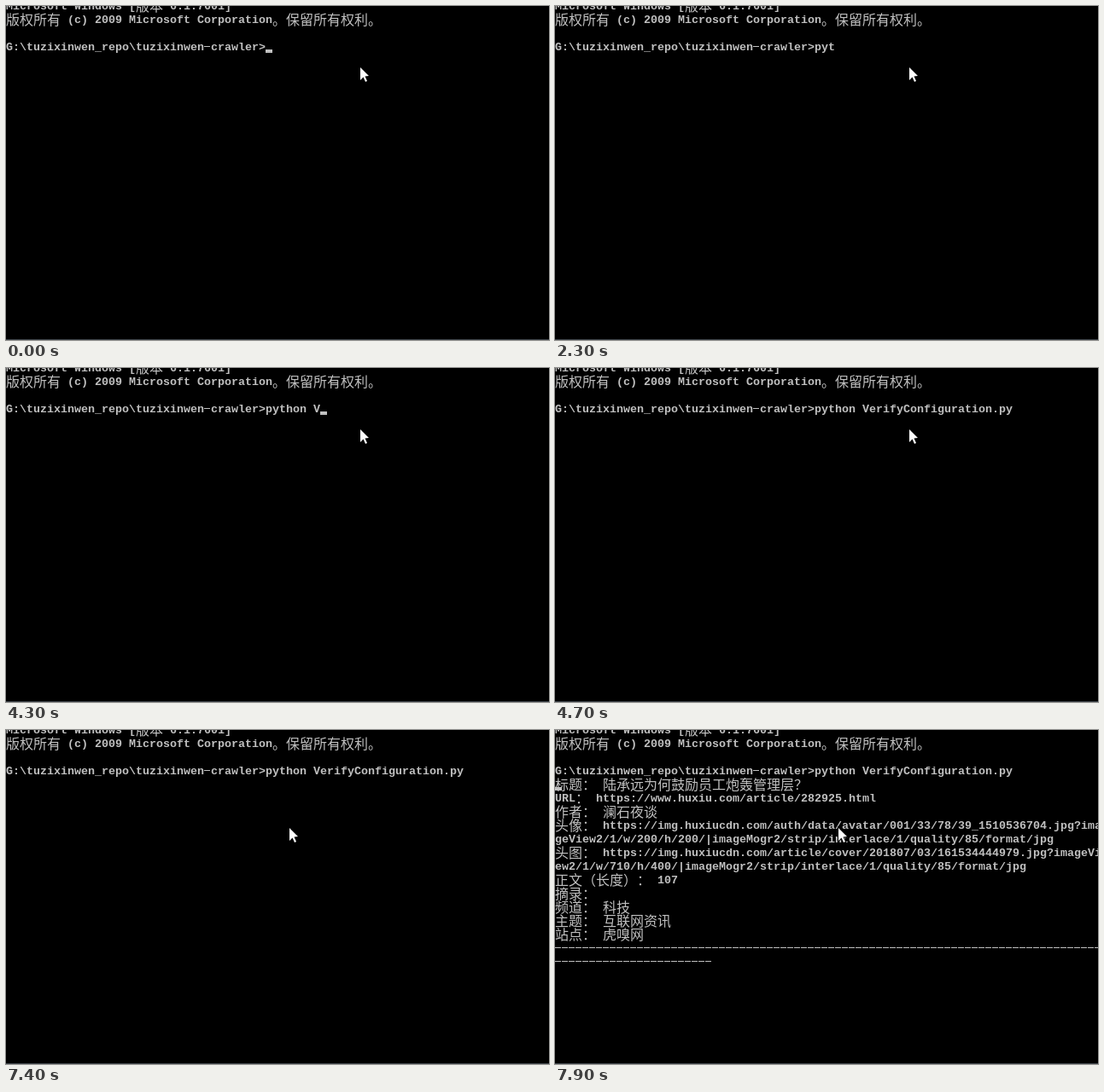
Recreate the animation shown at these times as an HTML page with a canvas. Size 636 px wide and 392 px high, loop 8 s.

```html
<!DOCTYPE html>
<html lang="zh-CN">
<head>
<meta charset="utf-8">
<title>Console</title>
<style>
html, body { margin: 0; width: 100%; height: 100%; overflow: hidden; background: #000; }
canvas { display: block; }
</style>
</head>
<body>
<canvas id="stage" width="636" height="392"></canvas>
<script>
const ctx = document.getElementById('stage').getContext('2d');
const LOOP = 8000, STEP = 100, CELL = 8, ROW = 16;
const LATIN = 'bold 13.333px "Liberation Mono", monospace';
const CJK = '300 16px "Noto Sans CJK SC", "Noto Sans CJK", sans-serif';

const header = [
  'Microsoft Windows [版本 6.1.7601]',
  '版权所有 (c) 2009 Microsoft Corporation。保留所有权利。',
  ''
];
const prompt = 'G:\\tuzixinwen_repo\\tuzixinwen-crawler>';
const command = 'python VerifyConfiguration.py';
const tail = 'strip/interlace/1/quality/85/format/jpg';
const output = [
  '标题： 陆承远为何鼓励员工炮轰管理层？',
  'URL： https://www.huxiu.com/article/282925.html',
  '作者： 澜石夜谈',
  '头像： https://img.huxiucdn.com/auth/data/avatar/001/33/78/39_1510536704.jpg?ima',
  'geView2/1/w/200/h/200/|imageMogr2/' + tail,
  '头图： https://img.huxiucdn.com/article/cover/201807/03/161534444979.jpg?imageVi',
  'ew2/1/w/710/h/400/|imageMogr2/' + tail,
  '正文（长度）： 107',
  '摘录：',
  '频道： 科技',
  '主题： 互联网资讯',
  '站点： 虎嗅网',
  '-'.repeat(80),
  '-'.repeat(23)
];

// Key presses in tenths of a second: ten letters, then Tab completes and Enter runs.
const keys = [8, 21, 23, 29, 31, 34, 36, 41, 44, 46, 47, 48, 54];
const LETTERS = 10;

const rowTop = row => row * ROW - 8;
const blinks = t => Math.floor((t - 152) / 515);
const clamp = v => Math.min(1, Math.max(0, v));

function drawLine(text, row) {
  let x = 0;
  const y = rowTop(row);
  for (const c of text) {
    const wide = c > '\u2000';
    if (c === '-') {
      ctx.fillRect(x, y + 7, 7, 1);
    } else {
      ctx.font = wide ? CJK : LATIN;
      ctx.fillText(c, x, y + (wide ? 14 : 12));
    }
    x += wide ? 2 * CELL : CELL;
  }
}

function drawPointer(x, y) {
  const arrow = new Path2D('M0 0V15L3.5 11.5L6 17L8 16L5.5 10.5L10 10Z');
  ctx.save();
  ctx.translate(x, y);
  ctx.strokeStyle = '#000';
  ctx.lineWidth = 2;
  ctx.stroke(arrow);
  ctx.fillStyle = '#fff';
  ctx.fill(arrow);
  ctx.restore();
}

function draw(time) {
  const t = Math.floor(time / STEP) * STEP;
  ctx.fillStyle = '#000';
  ctx.fillRect(0, 0, 636, 392);
  ctx.fillStyle = '#3c4248';
  ctx.fillRect(0, 391, 636, 1);

  ctx.fillStyle = '#c0c0c0';
  const pressed = keys.filter(k => k * 100 <= t);
  const done = pressed.length > LETTERS;
  const typed = done ? command.length : pressed.length;
  const lines = [...header, prompt + command.slice(0, typed)];
  if (t >= 7600) lines.push(...output);
  lines.forEach(drawLine);

  // A key press hides the caret; each blink after it toggles it.
  const lastKey = pressed.length ? pressed.at(-1) * 100 : -400;
  if ((blinks(t) - blinks(lastKey)) % 2) {
    const col = done ? 0 : prompt.length + typed;
    ctx.fillRect(col * CELL, rowTop(done ? 4 : 3) + 11, CELL, 4);
  }

  const move = clamp((t - 6500) / 200);
  const [x, y] = t < 6400 ? [415, 72] : [413, 75];
  drawPointer(Math.round(x + (332 - x) * move), Math.round(y + (115 - y) * move));
}

const start = performance.now();
function frame() {
  draw((performance.now() - start) % LOOP);
  requestAnimationFrame(frame);
}
frame();
</script>
</body>
</html>
```
